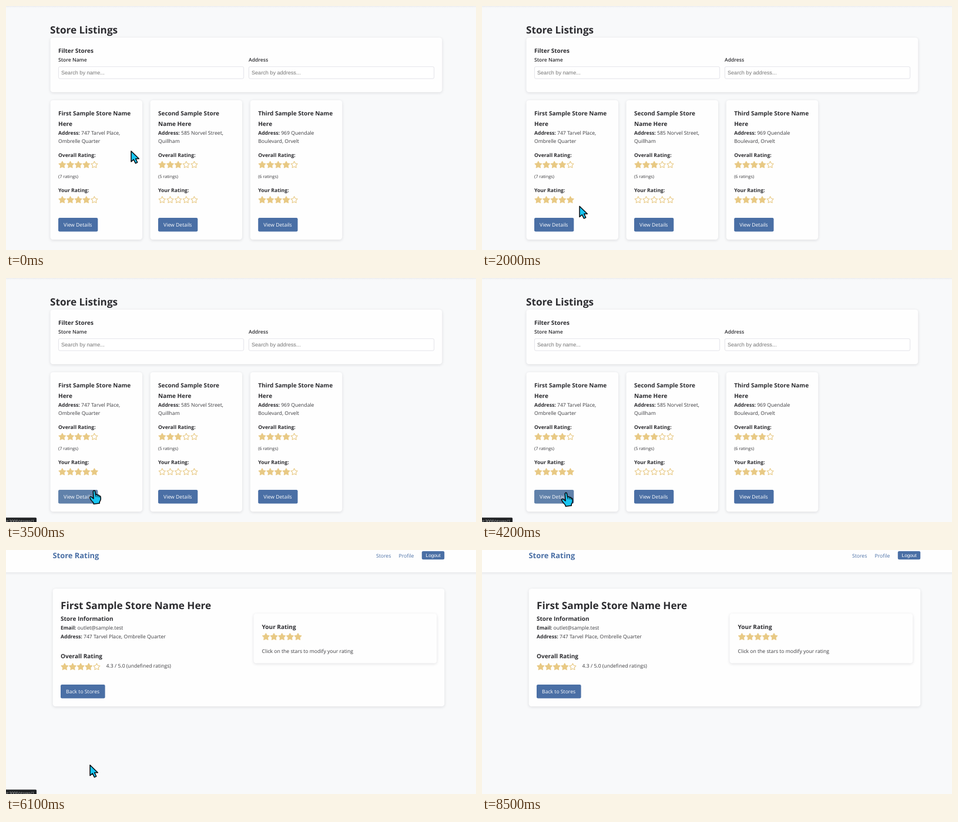
Animation, 800 px wide and 417 px high, one loop 8600 ms. Source, as an HTML page with a canvas:

```html
<!DOCTYPE html>
<html lang="en">
<head>
<meta charset="utf-8">
<title>Store Rating</title>
<style>
  html, body { margin: 0; width: 100%; height: 100%; overflow: hidden; background: #f8f9fa; }
  canvas { display: block; width: 800px; height: 417px; }
</style>
</head>
<body>
<canvas id="stage" width="800" height="417"></canvas>
<script>
const ctx = document.getElementById('stage').getContext('2d');
ctx.textRendering = 'geometricPrecision';

const LOOP = 8600, STEP = 100;
const SANS = '"Open Sans", "Noto Sans", sans-serif';
const ARIAL = '"Liberation Sans", Arial, sans-serif';
const BLUE = '#4a6fa5', HOVER = '#6081aa', GOLD = '#e8c984', CYAN = '#18c5f2';
const INK = '#2c2c30', BODY = '#3a3a3e';
const BASE = 8.65, H3 = 10.02, H1 = 17.15;

const TIMES = { rated: 1500, hover: 3500, loading: 4800, loaded: 5700, barOff: 6200, gone: 8400 };

const STORES = [
  { x: 75.5, title: ['First Sample Store Name', 'Here'], address: ['747 Tarvel Place,', 'Ombrelle Quarter'], overall: 4, count: 7, mine: 4 },
  { x: 245.5, title: ['Second Sample Store', 'Name Here'], address: ['585 Norvel Street,', 'Quillham'], overall: 3, count: 5, mine: 0 },
  { x: 415.7, title: ['Third Sample Store Name', 'Here'], address: ['969 Quendale', 'Boulevard, Orvelt'], overall: 4, count: 6, mine: 4 }
];

// Pointer keys: time, x, y
const PATH = [
  [0, 212.5, 247.5], [500, 157, 341], [1700, 157, 341], [2500, 184, 343.5],
  [2900, 184, 343.5], [3700, 144, 366.5], [4700, 142.5, 367], [6100, 142.5, 367],
  [7100, 389.5, 143.5], [7600, 389.5, 143.5], [8400, 430, 60]
];

function text(str, x, y, size = BASE, weight = 400, color = BODY, family = SANS) {
  ctx.font = `${weight} ${size}px ${family}`;
  ctx.fillStyle = color;
  ctx.fillText(str, x, y);
  return ctx.measureText(str).width;
}

function labelled(label, value, x, y) {
  const w = text(label + ' ', x, y, BASE, 700, INK);
  text(value, x + w, y);
}

function box(x, y, w, h, r, fill, border) {
  ctx.beginPath();
  ctx.roundRect(x, y, w, h, r);
  ctx.fillStyle = fill;
  ctx.fill();
  if (border) {
    ctx.strokeStyle = border;
    ctx.lineWidth = 0.8;
    ctx.stroke();
  }
}

function card(x, y, w, h) {
  ctx.save();
  ctx.shadowColor = 'rgba(30, 30, 50, 0.13)';
  ctx.shadowBlur = 5;
  ctx.shadowOffsetY = 1.2;
  box(x, y, w, h, 4.5, '#fefefe');
  ctx.restore();
}

function button(label, x, y, w, fill = BLUE) {
  box(x, y, w, 23.6, 2.3, fill);
  text(label, x + 9.1, y + 15.4, BASE, 400, '#fff');
}

function star(cx, cy, filled) {
  const outer = filled ? 6.1 : 5.9, inner = filled ? 3.2 : 3.05;
  ctx.beginPath();
  for (let i = 0; i < 10; i++) {
    const r = i % 2 ? inner : outer, a = i * Math.PI / 5;
    ctx.lineTo(cx + r * Math.sin(a), cy - r * Math.cos(a));
  }
  ctx.closePath();
  ctx.lineJoin = 'round';
  ctx.strokeStyle = ctx.fillStyle = GOLD;
  ctx.lineWidth = 1.1;
  if (filled) ctx.fill();
  ctx.stroke();
}

function stars(x, y, score) {
  for (let i = 0; i < 5; i++) star(x + 6.8 + i * 13.65, y + 0.5, i < score);
}

function field(label, hint, x) {
  text(label, x, 95.3, 8.55, 600, INK);
  box(x + 0.4, 103.7, 315.2, 20.4, 2.3, '#fff', '#dcdce4');
  text(hint, x + 5, 116.9, 9.1, 400, '#757575', ARIAL);
}

function storeCard(store, mine, hovered) {
  const x = store.x + 13.5;
  card(store.x, 161, 156.5, 238.3);
  store.title.forEach((line, i) => text(line, x, 187 + i * 17.5, H3, 700, INK));
  labelled('Address:', store.address[0], x, 219.6);
  text(store.address[1], x, 234.1);
  text('Overall Rating:', x, 258, BASE, 700, INK);
  stars(x, 271, store.overall);
  text(`(${store.count} ratings)`, x, 294.4, 7.35);
  text('Your Rating:', x, 318, BASE, 700, INK);
  stars(x, 331, mine);
  button('View Details', x, 362, 67.3, hovered ? HOVER : BLUE);
}

function listing(t) {
  const shade = ctx.createLinearGradient(0, 0, 0, 3);
  shade.addColorStop(0, '#ebecef');
  shade.addColorStop(1, '#f8f9fa');
  ctx.fillStyle = shade;
  ctx.fillRect(0, 0, 800, 3);

  text('Store Listings', 75, 46.6, H1, 700, INK);
  card(75.5, 54, 666.7, 93.3);
  text('Filter Stores', 89, 80.2, 9.95, 700, INK);
  field('Store Name', 'Search by name...', 89);
  field('Address', 'Search by address...', 413);
  STORES.forEach((store, i) => {
    const first = i === 0;
    storeCard(store, first && t >= TIMES.rated ? 5 : store.mine, first && t >= TIMES.hover);
  });
}

function header() {
  ctx.save();
  ctx.shadowColor = 'rgba(30, 30, 50, 0.15)';
  ctx.shadowBlur = 5;
  ctx.shadowOffsetY = 1.2;
  ctx.fillStyle = '#fefefe';
  ctx.fillRect(-10, -10, 820, 48.2);
  ctx.restore();
  text('Store Rating', 79.5, 14.3, 12.9, 700, BLUE);
  text('Stores', 630, 12.6, BASE, 400, BLUE);
  text('Profile', 668.5, 12.6, BASE, 400, BLUE);
  box(707.8, 2, 38.4, 14.3, 2.3, BLUE);
  text('Logout', 714.6, 12.1, 8.2, 400, '#fff', ARIAL);
}

function details() {
  card(79.7, 66, 666.6, 201.3);
  text('First Sample Store Name Here', 93, 100.7, H1, 700, INK);
  text('Store Information', 93, 121, H3, 700, INK);
  labelled('Email:', 'outlet@sample.test', 93, 136.1);
  labelled('Address:', '747 Tarvel Place, Ombrelle Quarter', 93, 150.7);
  text('Overall Rating', 93, 185.4, H3, 700, INK);
  stars(93, 199.3, 4);
  text('4.3 / 5.0 (undefined ratings)', 170.6, 201);
  button('Back to Stores', 93, 230, 75.6);

  card(421.5, 108.5, 311.7, 85);
  text('Your Rating', 435.6, 134.6, H3, 700, INK);
  stars(435.6, 148, 5);
  text('Click on the stars to modify your rating', 435.6, 176.3);
}

function statusBar() {
  box(-5, 409.6, 57, 12, 1.5, '#202224');
  ctx.textAlign = 'right';
  text('localhost:3000/stores/1', 48, 418, 6.6, 400, '#c4c6c8');
  ctx.textAlign = 'left';
}

function pointerAt(t) {
  const i = Math.max(1, PATH.findIndex(key => key[0] >= t));
  const [t0, x0, y0] = PATH[i - 1], [t1, x1, y1] = PATH[i];
  const u = (t - t0) / (t1 - t0), e = u * u * (3 - 2 * u);
  return [x0 + (x1 - x0) * e, y0 + (y1 - y0) * e];
}

function paintCursor(shape) {
  ctx.lineJoin = ctx.lineCap = 'round';
  ctx.fillStyle = CYAN;
  ctx.strokeStyle = '#08090c';
  ctx.lineWidth = 1.5;
  ctx.fill(shape);
  ctx.stroke(shape);
}

const ARROW = new Path2D('M.5 .5V18.6L4.7 14.9L8 21.4L11.2 19.8L8.2 13.5H13.8Z');
const HAND = new Path2D('M-2 1.8Q-1 -.7 1 .8L2.4 7.6Q4.5 6 5.8 8.2Q7.6 7.2 8.6 9.4Q10.7 9.2 10.9 11.6' +
  'Q11.7 16.5 9 19.5V22.2L-1 23.4L-1.6 21Q-5.5 17.5 -7.8 12.6Q-7.6 9.6 -4.8 11.2L-1.2 14.2Z');
const CREASES = new Path2D('M2.4 7.6L3.1 11M5.8 8.2L6.4 11.2M8.6 9.4L9 11.8');

function cursor(t) {
  const [x, y] = pointerAt(t);
  const hand = (t >= 500 && t < 1900) || (t >= TIMES.hover && t < TIMES.loading);
  ctx.save();
  ctx.translate(x, y);
  paintCursor(hand ? HAND : ARROW);
  if (hand) {
    ctx.lineWidth = 1;
    ctx.stroke(CREASES);
  }
  ctx.restore();
}

function draw(t) {
  ctx.fillStyle = '#f8f9fa';
  ctx.fillRect(0, 0, 800, 417);
  if (t < TIMES.loading) {
    listing(t);
  } else {
    header();
    if (t >= TIMES.loaded) {
      details();
    } else {
      card(79.7, 66, 666.6, 41.4);
      text('Loading store details...', 93, 90);
    }
  }
  if (t >= TIMES.hover && t < TIMES.barOff) statusBar();
  if (t < TIMES.gone) cursor(t);
}

const start = performance.now();
function tick() {
  const t = (performance.now() - start) % LOOP;
  draw(Math.floor(t / STEP) * STEP);
  requestAnimationFrame(tick);
}
tick();
</script>
</body>
</html>
```
